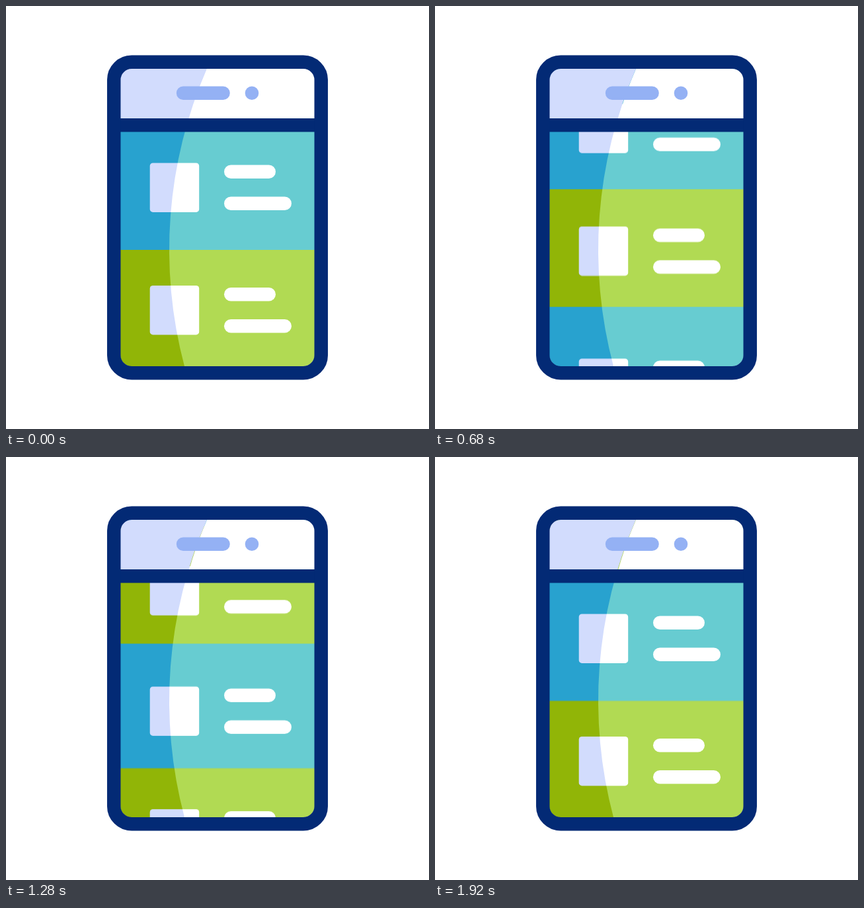
Animation of 640x640 px, one loop 2000 ms. Source, as an HTML page without scripts:

```html
<!DOCTYPE html>
<html lang="en">
<head>
<meta charset="utf-8">
<title>Scrolling phone list</title>
<style>
  html, body { margin: 0; width: 100%; height: 100%; overflow: hidden; background: #fff; }
  svg { display: block; width: 100%; height: 100%; }

  .lit    { --blue: #67ccd1; --green: #b1da53; --paper: #fff; }
  .shaded { --blue: #28a2cf; --green: #91b507; --paper: #d2dcfd; }
  .blue  { fill: var(--blue); }
  .green { fill: var(--green); }
  .paper { fill: var(--paper); }
  .navy  { fill: #032a75; }
  .soft  { fill: #94b1f4; }

  /* Rows drift slightly against the bands behind them */
  .bands { --rise: -366.5px; }
  .first { --rise: -357px; }
  .next  { --rise: -395px; }
  .bands, .first, .next { animation: scroll 2s infinite; }
  @keyframes scroll {
    0% { transform: translateY(0); }
    4% { transform: translateY(0); animation-timing-function: cubic-bezier(.3333, 0, .6667, 1); }
    96%, 100% { transform: translateY(var(--rise)); }
  }
</style>
</head>
<body>
<svg viewBox="0 0 640 640">
  <defs>
    <clipPath id="screen"><rect x="173" y="95" width="294" height="450" rx="17"/></clipPath>
    <clipPath id="shade"><path d="M304 95A686 686 0 0 0 270 545H160V95Z"/></clipPath>
    <g id="row">
      <rect class="paper" x="217.7" width="74.5" height="74.5" rx="4.5"/>
      <rect fill="#fff" x="330" y="3" width="78" height="20.5" rx="10.25"/>
      <rect fill="#fff" x="330" y="51" width="102" height="20.5" rx="10.25"/>
    </g>
    <g id="pair">
      <use href="#row" y="237.4"/>
      <use href="#row" y="422.9"/>
    </g>
    <g id="stripes">
      <rect class="blue" x="160" y="180" width="320" height="740"/>
      <rect class="green" x="160" y="369" width="320" height="178"/>
      <rect class="green" x="160" y="735.5" width="320" height="190"/>
    </g>
  </defs>

  <g clip-path="url(#screen)">
    <g class="lit">
      <rect class="paper" x="160" y="84" width="320" height="96"/>
      <g class="bands"><use href="#stripes"/></g>
      <g class="first"><use href="#pair"/></g>
      <g class="next"><use href="#pair" y="395"/></g>
    </g>
    <g class="shaded" clip-path="url(#shade)">
      <g class="bands"><use href="#stripes"/></g>
      <g class="first"><use href="#pair"/></g>
      <g class="next"><use href="#pair" y="395"/></g>
      <rect class="paper" x="160" y="84" width="320" height="96"/>
    </g>
    <!-- header covers rows that scroll past the bar -->
    <g class="lit">
      <path class="paper" d="M304 95Q288 131 274.5 180H480V84H304Z" clip-path="url(#head)"/>
    </g>
  </g>

  <clipPath id="head"><path d="M304 95A686 686 0 0 0 270 545H480V95Z"/></clipPath>
  <rect class="soft" x="257.8" y="121.5" width="81" height="20.5" rx="10.25"/>
  <circle class="soft" cx="372" cy="131.7" r="10.3"/>
  <rect class="navy" x="163" y="170" width="314" height="20.5"/>
  <rect x="163.2" y="84.8" width="313.6" height="470.4" rx="27" fill="none" stroke="#032a75" stroke-width="20.5"/>
</svg>
</body>
</html>
```
